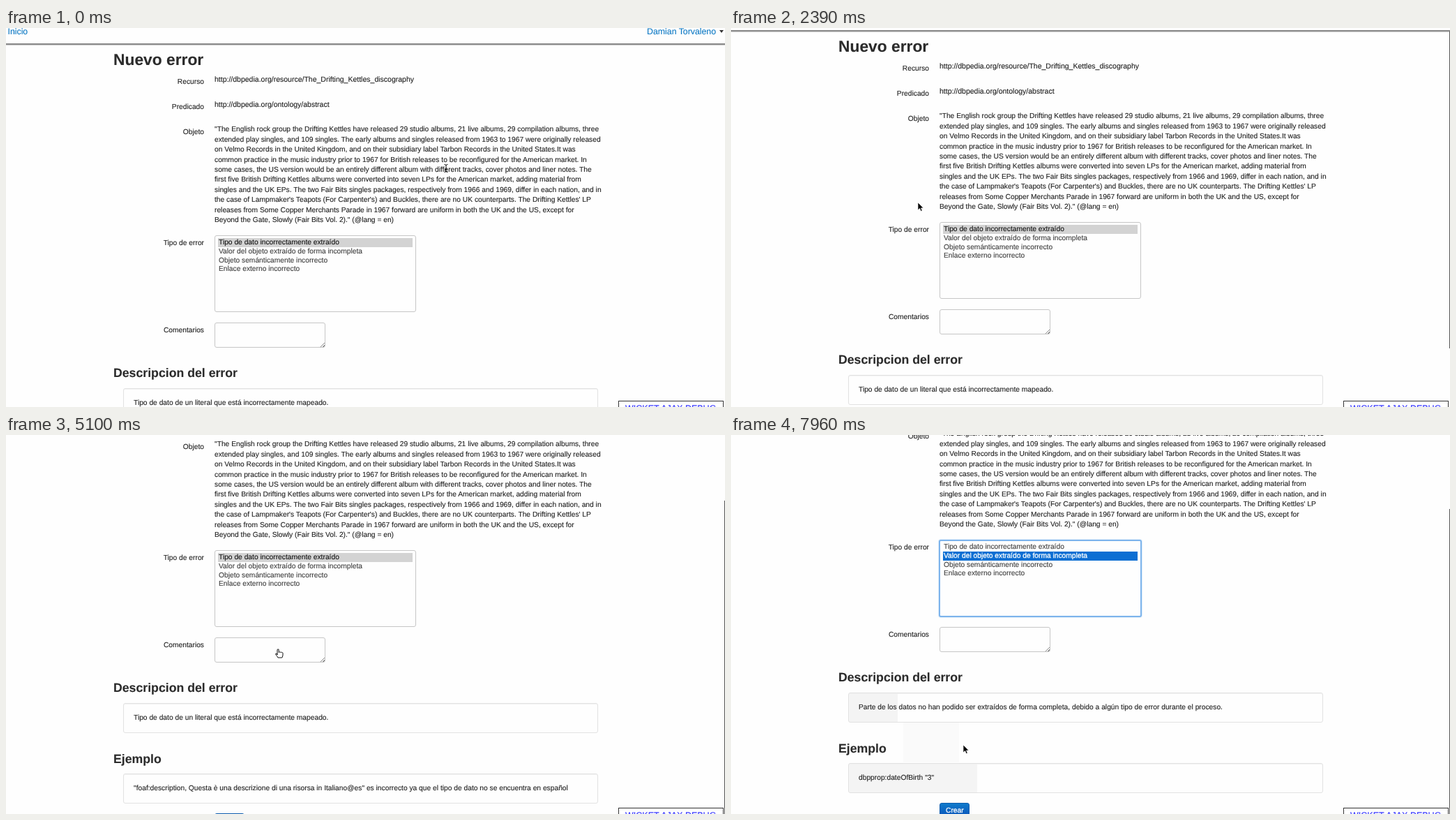
An HTML page for the animation above (8000 ms loop, 1031 by 543 pixels).

```html
<!DOCTYPE html>
<html lang="es">
<head>
<meta charset="utf-8">
<title>Nuevo error</title>
<style>
html, body { margin: 0; width: 100%; height: 100%; overflow: hidden; background: #fefefe; }
body { position: relative; font: 10.26px "Liberation Sans", Arial, sans-serif; color: #1e1e1e; text-rendering: geometricPrecision; -webkit-text-stroke: .1px; }
div, span, svg { position: absolute; box-sizing: border-box; }
span { white-space: pre; line-height: 20px; }
#page { left: 0; top: 0; width: 1031px; height: 543px; }
.label { text-align: right; width: 284px; }
.url { font-size: 10.5px; }
.h1 { font-size: 22.8px; font-weight: bold; color: #2b2b2b; }
.h2 { font-size: 17.7px; font-weight: bold; color: #2b2b2b; }
.nav { font-size: 12.3px; color: #0b78c4; }
.user { width: 1018px; text-align: right; }
.caret { background: #333; clip-path: polygon(0 0, 100% 0, 50% 100%); }
.option { color: #3c3c3c; }
.white { color: #fff; -webkit-text-stroke: .3px; }
.rule { background: #8a8a8a; box-shadow: 0 1px 1px #ccc; }
.field { border: 1px solid #c6c6c6; border-radius: 3px; background: #fefefe; }
.focus { border: 2px solid #7db4ec; box-shadow: 0 0 2px #8fc0f0; }
.grip { background: linear-gradient(135deg, transparent 48%, #888 48% 58%, transparent 58% 74%, #888 74% 84%, transparent 84%); }
.well { border: 1px solid #e2e2e2; border-radius: 3px; box-shadow: inset 0 1px 1px #f1f1f1; }
.grey { background: #f4f4f4; }
.faint { background: #fafafa; }
.button { border-radius: 3px; background: linear-gradient(#0f7acb, #0a50b8); border: 1px solid #0d5cae; }
#bar { left: 1030px; width: 1px; height: 454px; background: #555; }
#debug { left: 878px; top: 534px; width: 151px; height: 30px; border: 1px solid #333; background: #fff; }
#debug span { left: 9px; top: 0; font-size: 12.5px; color: #33f; }
svg { left: 0; top: 0; overflow: visible; }
</style>
</head>
<body>
<div id="page"></div>
<div id="bar"></div>
<div id="debug"><span>WICKET AJAX DEBUG</span></div>
<svg width="1" height="1"><g id="cursor">
  <path id="arrow" d="M0 0V11L2.6 8.6L4.3 12.6L6.2 11.8L4.6 8H8Z" stroke="#fff" stroke-width=".7"/>
  <path id="beam" d="M-2.5-5.5Q0-5.5 0-4V4Q0 5.5-2.5 5.5M2.5-5.5Q0-5.5 0-4M0 4Q0 5.5 2.5 5.5M-1.5 1.5H1.5" fill="none" stroke="#111"/>
  <path id="hand" d="M-3 2V-5a1.1 1.1 0 0 1 2.2 0V-1.5a1.1 1 0 0 1 2.1 0a1.1 1 0 0 1 2 .3a1 1 0 0 1 1.7 .7V2Q5 4 3.8 6H-2Q-3.5 3.5-5.5 1Q-5.5-1-3 1Z" fill="#fff" stroke="#111"/>
</g></svg>
<script>
const $ = id => document.getElementById(id);
const page = $('page');

function add(tag, cls, x, y) {
  const el = page.appendChild(document.createElement(tag));
  el.className = cls;
  el.style.left = x + 'px';
  el.style.top = y + 'px';
  return el;
}
function box(cls, x, y, w, h) {
  const el = add('div', cls, x, y);
  el.style.width = w + 'px';
  el.style.height = h + 'px';
  return el;
}
// y is the middle of the line
function text(cls, x, y, str) {
  const el = add('span', cls, x, y - 9);
  el.textContent = str;
  return el;
}
const show = (el, on) => { el.style.display = on ? '' : 'none'; };

box('rule', 0, 22, 1031, 2);
text('nav', 2.5, 4, 'Inicio');
text('nav user', 0, 4, 'Damian Torvaleno');
box('caret', 1023, 3, 6, 4);

text('h1', 154, 44, 'Nuevo error');
text('label', 0, 77, 'Recurso');
text('url', 299, 73, 'http://dbpedia.org/resource/The_Drifting_Kettles_discography');
text('label', 0, 113, 'Predicado');
text('url', 299, 109, 'http://dbpedia.org/ontology/abstract');
text('label', 0, 149, 'Objeto');
`"The English rock group the Drifting Kettles have released 29 studio albums, 21 live albums, 29 compilation albums, three
extended play singles, and 109 singles. The early albums and singles released from 1963 to 1967 were originally released
on Velmo Records in the United Kingdom, and on their subsidiary label Tarbon Records in the United States.It was
common practice in the music industry prior to 1967 for British releases to be reconfigured for the American market. In
some cases, the US version would be an entirely different album with different tracks, cover photos and liner notes. The
first five British Drifting Kettles albums were converted into seven LPs for the American market, adding material from
singles and the UK EPs. The two Fair Bits singles packages, respectively from 1966 and 1969, differ in each nation, and in
the case of Lampmaker's Teapots (For Carpenter's) and Buckles, there are no UK counterparts. The Drifting Kettles' LP
releases from Some Copper Merchants Parade in 1967 forward are uniform in both the UK and the US, except for
Beyond the Gate, Slowly (Fair Bits Vol. 2)." (@lang = en)`
  .split('\n').forEach((str, i) => text('', 299, 145.2 + 14.44 * i, str));

text('label', 0, 308, 'Tipo de error');
const select = box('field', 299, 297, 289, 110);
const focus = box('field focus', 298, 297, 291, 111);
const mark = box('', 304, 301, 279, 13);
const options = ['Tipo de dato incorrectamente extraído', 'Valor del objeto extraído de forma incompleta',
  'Objeto semánticamente incorrecto', 'Enlace externo incorrecto']
  .map((str, i) => text('option', 305, 307 + 12.8 * i, str));

text('label', 0, 433, 'Comentarios');
box('field', 299, 422, 159, 36);
box('grip', 451, 451, 6, 6);

const ghost = box('faint', 247, 559, 80, 57);
text('h2', 154, 493, 'Descripcion del error');
const grey1 = box('grey', 169, 517, 70, 41);
box('well', 168, 516, 681, 43);
const about = text('', 183, 537, '');
text('h2', 154, 595, 'Ejemplo');
const grey2 = box('grey', 169, 618, 184, 41);
box('well', 168, 617, 681, 43);
const sample = text('', 183, 638, '');
box('button', 299, 674, 43, 23);
text('white', 308, 685, 'Crear');

// [first change, last change, steps, distance]
const scrolls = [
  [1650, 1710, 2, 19], [4350, 4410, 2, 63], [4650, 5480, 4, 66], [5690, 5690, 1, -1]
];

// [first change, last change, steps, x, y, sag of the arc]; each starts where the one before ends
const moves = [
  [0, 0, 1, 631, 201, 0],
  [60, 60, 1, 569, 201, 0],
  [270, 1030, 14, 237, 211, -48],
  [2390, 3160, 14, 462, 166, 95],
  [3220, 3630, 8, 335, 170, -28],
  [3690, 3970, 6, 344, 297, 0],
  [4030, 4140, 3, 392, 313, 0],
  [5690, 5860, 2, 379, 193, 0],
  [6040, 6370, 7, 366, 179, 0],
  [6880, 7240, 4, 160, 398, 0],
  [7390, 7960, 11, 333, 444, 100]
];

// eased share of a stepped move that is done at time t
function done(t, start, end, steps) {
  if (t < start) return 0;
  if (t >= end) return 1;
  const u = (Math.floor((t - start) / (end - start) * (steps - 1)) + 1) / steps;
  return 1 - (1 - u) ** 2;
}

function cursorAt(t) {
  let x = 0, y = 0;
  for (const [start, end, steps, toX, toY, sag] of moves) {
    const u = done(t, start, end, steps);
    x += (toX - x) * u;
    y += (toY - y) * u + sag * 4 * u * (1 - u);
    if (u < 1) break;
  }
  return [x, y];
}

function draw(t) {
  const scroll = Math.round(scrolls.reduce((sum, [start, end, steps, way]) =>
    sum + way * done(t, start, end, steps), 0));
  page.style.transform = `translateY(${-scroll}px)`;
  $('bar').style.top = Math.round(scroll * 0.79 - 10) + 'px';
  show($('bar'), scroll > 0);

  const [x, y] = cursorAt(t);
  const kind = t >= 4030 && t < 6880 ? 'hand' : x < 299 || t >= 6880 ? 'arrow' : 'beam';
  for (const id of ['arrow', 'beam', 'hand']) show($(id), id === kind);
  $('cursor').setAttribute('transform', `translate(${x} ${y})`);

  const picked = t >= 6300;
  show(select, !picked);
  show(focus, picked);
  mark.style.top = (picked ? 314 : 301) + 'px';
  mark.style.background = picked ? '#0d6fd3' : '#d3d3d3';
  options[0].style.color = picked ? '' : '#111';
  options[1].className = picked ? 'white' : 'option';

  const changed = t >= 6640;
  about.textContent = changed
    ? 'Parte de los datos no han podido ser extraídos de forma completa, debido a algún tipo de error durante el proceso.'
    : 'Tipo de dato de un literal que está incorrectamente mapeado.';
  sample.textContent = changed
    ? 'dbpprop:dateOfBirth "3"'
    : '"foaf:description, Questa è una descrizione di una risorsa in Italiano@es" es incorrecto ya que el tipo de dato no se encuentra en español';

  // the grey well fill returns along the cursor's way
  show(grey1, t >= 7240);
  show(grey2, t >= 7390);
  show(ghost, t >= 7390);
  grey2.style.width = 184 * done(t, 7390, 7960, 11) + 'px';
}

function tick() {
  draw(performance.now() % 8000);
  requestAnimationFrame(tick);
}
tick();
</script>
</body>
</html>
```
